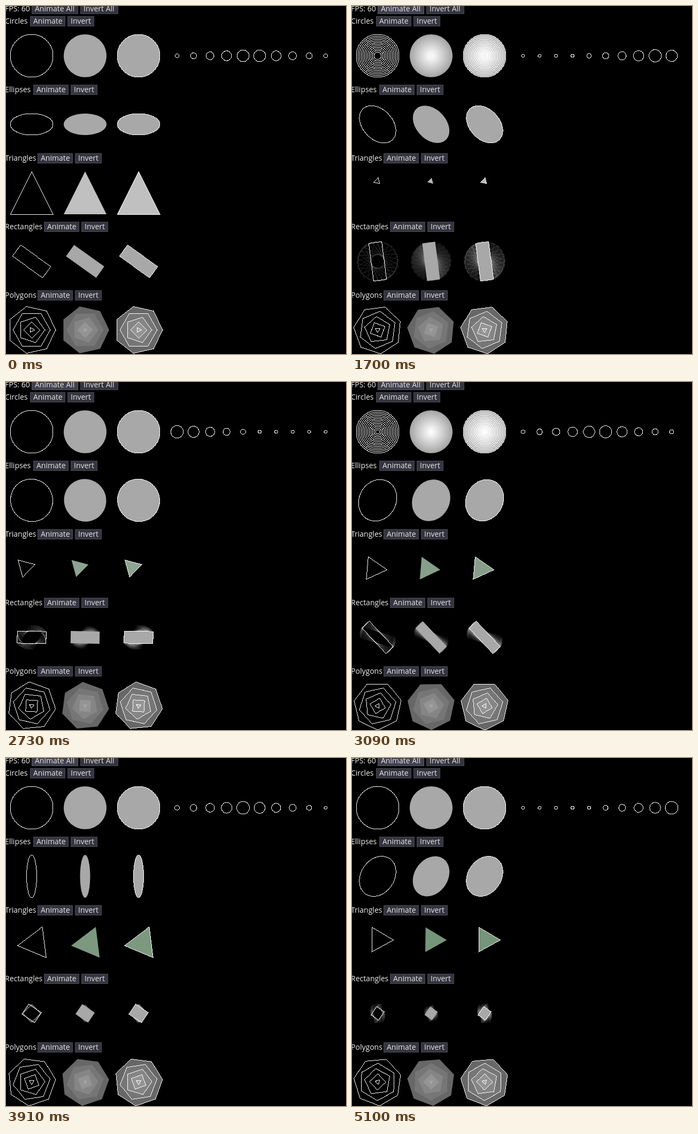
Write an HTML page with a canvas that moves like this. It is 636x650 px and loops after 5170 ms.

```html
<!DOCTYPE html>
<html>
<head>
<meta charset="utf-8">
<style>
  html, body { margin: 0; width: 100%; height: 100%; overflow: hidden; background: #000; }
  canvas { display: block; }
</style>
</head>
<body>
<canvas id="stage" width="636" height="650"></canvas>
<script>
const ctx = document.getElementById('stage').getContext('2d');
const { sin, cos, exp, PI } = Math;
const TAU = PI * 2;

const LOOP = 5170;        // ms
const HOVER_AT = 1310;    // ms, pointer reaches the button
const STEP = 68.9;        // ms between pictures
const LAST_STEP = 55;
const START = 2.3;        // step at which the shapes begin to move
const RATE = 15;          // steps per second of shape time
const TRAIL = 15;         // ghosts behind each rectangle, 60 per second

const COLUMNS = [
  { x: 48, lined: true },
  { x: 148, filled: true },
  { x: 248, filled: true, lined: true }
];

const gray = v => `rgb(${v},${v},${v})`;
const rad = deg => deg * PI / 180;

function rotate(points, angle) {
  const c = cos(angle), s = sin(angle);
  return points.map(([x, y]) => [x * c - y * s, x * s + y * c]);
}

function regular(n, r, angle) {
  return Array.from({ length: n }, (_, i) => {
    const a = angle + i / n * TAU;
    return [r * cos(a), r * sin(a)];
  });
}

// The slight inset keeps the far edges inside their pixel.
function ellipse(a, b, angle = 0) {
  const unit = regular(Math.max(14, Math.round(a * 2)), 1, 0);
  return rotate(unit.map(([x, y]) => [x * (a - 0.01), y * (b - 0.01)]), angle);
}

function fill(points, x, y, color) {
  ctx.fillStyle = color;
  ctx.beginPath();
  for (const [px, py] of points) ctx.lineTo(x + px, y + py);
  ctx.fill();
}

// Hard-edged outline, one pixel wide.
function outline(points, x, y, color = '#fff') {
  ctx.fillStyle = color;
  points.forEach(([ax, ay], i) => {
    const [bx, by] = points[(i + 1) % points.length];
    const n = Math.max(1, Math.ceil(Math.max(Math.abs(bx - ax), Math.abs(by - ay))));
    for (let j = 0; j < n; j++) {
      ctx.fillRect(Math.floor(x + ax + (bx - ax) * j / n),
                   Math.floor(y + ay + (by - ay) * j / n), 1, 1);
    }
  });
}

function shape(points, y, fillColor, lineColor) {
  for (const { x, filled, lined } of COLUMNS) {
    if (filled) fill(points, x, y, fillColor);
    if (lined) outline(points, x, y, lineColor);
  }
}

function text(str, x, y, color) {
  ctx.fillStyle = color;
  ctx.fillText(str, x, y);
}

function button(label, x, y, w, hot) {
  ctx.fillStyle = hot ? '#5c5c6a' : '#4a4955';
  ctx.fillRect(x, y, w, 19);
  ctx.fillStyle = hot ? '#40404e' : '#353540';
  ctx.fillRect(x + 1, y + 1, w - 2, 17);
  text(label, x + 6, y + 14, '#e4e4e4');
}

function drawMenu(hot) {
  ctx.font = '14px "Open Sans", "Noto Sans", sans-serif';
  text('FPS: 60', -2, 10, '#f0f0f0');
  button('Animate All', 48, -4, 87, hot);
  button('Invert All', 139, -4, 71);
  const rows = [['Circles', 45], ['Ellipses', 51], ['Triangles', 59],
                ['Rectangles', 71], ['Polygons', 59]];
  rows.forEach(([label, x], i) => {
    const y = 19 + i * 128;
    text(label, -2, y + 14, '#f0f0f0');
    button('Animate', x, y, 66);
    button('Invert', x + 70, y, 50);
  });
}

function drawCircles(t) {
  const depth = 37 * Math.max(0, sin(5 * t));
  for (let d = 0; d <= depth; d += 3) {
    shape(ellipse(40 - d, 40 - d), 93, gray(Math.min(255, 168 + d / 3 * 7)));
  }
  const peak = 4.5 + 4.5 * sin(4 * t);
  for (let i = 0; i < 10; i++) {
    const r = Math.max(3, 12 - 1.85 * Math.abs(i - peak));
    outline(ellipse(r, r), 320 + i * 30.88, 93);
  }
}

function drawEllipses(t) {
  shape(ellipse(40, 40 * sin(t + PI / 6), 3.3 * t), 221, gray(168));
}

// Stands still at first, then turns, swells and drifts while going green.
function triangleAt(t) {
  if (t === 0) return [[0, -40], [40, 40], [-40, 40]];
  const dx = -12 * sin(t * t);
  const dy = -7 - 18 * exp(-t / 2) * cos(1.6 * t);
  return regular(3, 20 - 14 * cos(1.2 * t), rad(30 + 60 * t))
    .map(([x, y]) => [x + dx, y + dy]);
}

function drawTriangles(t) {
  const fade = exp(-0.8 * t);
  const color = `rgb(${112 + 80 * fade},${146 + 46 * fade},${117 + 75 * fade})`;
  shape(triangleAt(t), 349, color);
}

// The spin starts fast, slows down and reverses; the sides pulse and shrink.
function rectAt(t) {
  const pulse = cos(4.6 * t - 0.7);
  const l = (54 - 5 * t + 20 * pulse) / 2;
  const w = (29 - 4 * t - 4 * pulse) / 2;
  const angle = rad(35.5 + 1620 * (1 - exp(-0.82 * t)) - 282 * t);
  return rotate([[-l, -w], [l, -w], [l, w], [-l, w]], angle);
}

function drawRects(t) {
  for (let j = TRAIL; j > 0; j--) {
    const past = t - j / 60;
    if (past < 0) continue;
    const age = 1 - j / (TRAIL + 1);
    shape(rectAt(past), 477, `rgba(255,255,255,${0.08 * age})`,
          `rgba(255,255,255,${0.06 + 0.1 * age})`);
  }
  shape(rectAt(t), 477, gray(168));
}

// Inner polygons turn faster; outer ones also sway a little.
function drawPolygons(t) {
  for (let i = 0; i < 5; i++) {
    const angle = -(67 + 12 * i) * t - (12 - 3 * i) * sin(1.3 * t);
    shape(regular(7 - i, 45 - 10 * i, rad(angle)), 605, gray(103 + 15 * i));
  }
}

function stepAt(ms) {
  if (ms < HOVER_AT) return -1;
  return Math.min(LAST_STEP, Math.floor((ms - HOVER_AT) / STEP + 0.5));
}

function draw(step) {
  const t = Math.max(0, (step - START) / RATE);
  ctx.fillStyle = '#000';
  ctx.fillRect(0, 0, 636, 650);
  drawMenu(step >= 0);
  drawCircles(t);
  drawEllipses(t);
  drawTriangles(t);
  drawRects(t);
  drawPolygons(t);
}

const begin = performance.now();
let shown = null;
function tick() {
  const step = stepAt((performance.now() - begin) % LOOP);
  if (step !== shown) draw(shown = step);
  requestAnimationFrame(tick);
}
tick();
</script>
</body>
</html>
```
